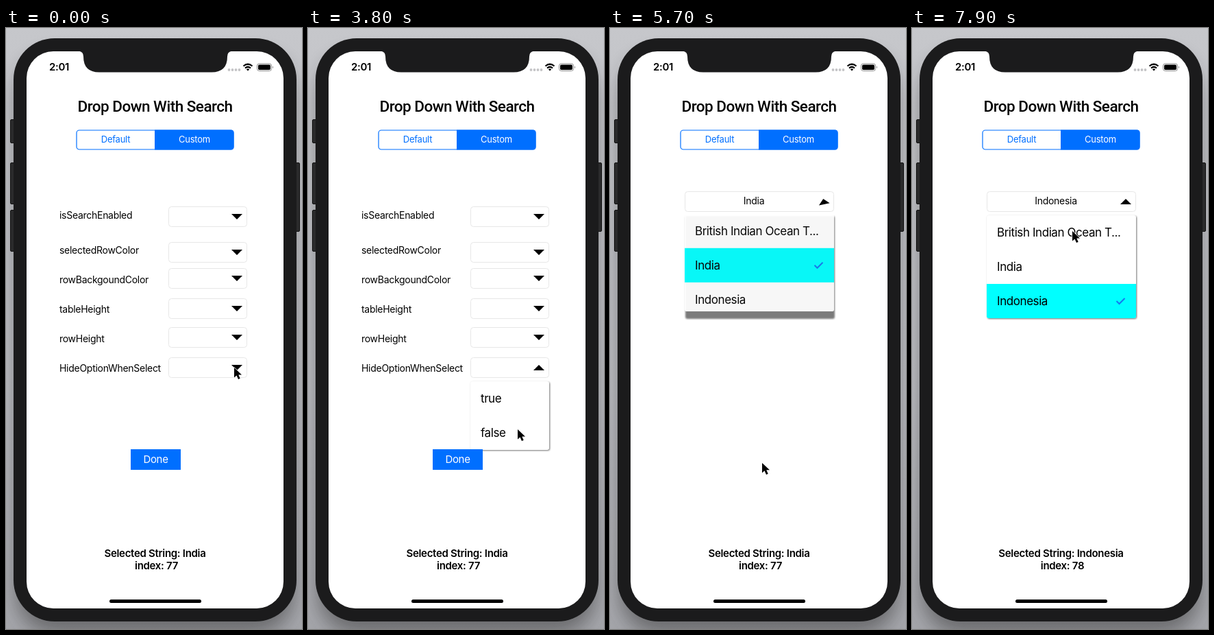
Recreate the animation shown at these times as an HTML page. Size 432x876 px, loop 8000 ms.

```html
<!DOCTYPE html>
<html lang="en">
<head>
<meta charset="utf-8">
<title>Drop down with search</title>
<style>
  html, body { margin: 0; width: 100%; height: 100%; overflow: hidden; background: #b9babf; }
  svg { display: block; width: 100vw; height: 100vh; }
  text { font-family: Inter, "Liberation Sans", sans-serif; font-size: 14px; letter-spacing: -.02em; white-space: pre; }
  .title { font-family: Roboto, sans-serif; font-size: 22.5px; font-weight: 500; letter-spacing: -.5px; }
  .mid { text-anchor: middle; }
  .bold { font-size: 15px; font-weight: 600; }
  .seg { font-size: 13px; }
  .done { font-size: 15px; }
  .row { font-size: 17px; letter-spacing: -.025em; }
  .field { fill: #fff; stroke: #e7e7e7; }
</style>
</head>
<body>
<svg id="stage" viewBox="0 0 432 876" xmlns="http://www.w3.org/2000/svg"></svg>
<script>
const LOOP = 8000, STEP = 100;
const BLUE = '#006fff', CYAN = '#00ffff';
const stage = document.getElementById('stage');

const text = (x, y, value, cls = '', extra = '') =>
  `<text x="${x}" y="${y}" class="${cls}" ${extra}>${value}</text>`;
const rect = (x, y, w, h, r, fill, extra = '') =>
  `<rect x="${x}" y="${y}" width="${w}" height="${h}" rx="${r}" fill="${fill}" ${extra}/>`;
const arrow = (x, y, id = '') =>
  `<g transform="translate(${x} ${y})"><path id="${id}" d="M-8-4H8L0 4Z"/></g>`;
const field = (x, y, w, id) =>
  `<rect class="field" x="${x + .5}" y="${y + .5}" width="${w - 1}" height="29" rx="4"/>` +
  arrow(x + w - 15, y + 15, id);
const check = y =>
  `<path d="M298.500 ${y + 25}l4 4 8-8" fill="none" stroke="#1478f0" stroke-width="2"/>`;

const options = [
  ['isSearchEnabled', 278, 260], ['selectedRowColor', 329, 312], ['rowBackgoundColor', 372, 350],
  ['tableHeight', 415, 394], ['rowHeight', 458, 436], ['HideOptionWhenSelect', 501, 480]
];

const dropList = id => `
  <rect id="${id}Shadow" rx="3" filter="url(#soft)"/>
  <clipPath id="${id}Clip"><rect id="${id}Mask" rx="3"/></clipPath>
  <g id="${id}" clip-path="url(#${id}Clip)">
    <rect id="${id}Back" fill="#fff"/><g id="${id}Rows"></g>
  </g>`;

const backdrop = `
  <defs>
    <linearGradient id="wall" x2="0" y2="1">
      <stop stop-color="#c6c7cb"/><stop offset=".6" stop-color="#bbbcc1"/><stop offset="1" stop-color="#a5a6ab"/>
    </linearGradient>
    <filter id="soft" x="-10%" y="-10%" width="120%" height="120%"><feGaussianBlur stdDeviation="1.2"/></filter>
    <filter id="haze" x="-20%" y="-20%" width="140%" height="140%"><feGaussianBlur stdDeviation="14"/></filter>
  </defs>
  ${rect(0, 0, 432, 876, 0, 'url(#wall)')}
  ${rect(14, 40, 407, 844, 60, '#333', 'opacity=".5" filter="url(#haze)"')}
  ${[[6, 133, 35], [6, 196, 61], [6, 265, 61], [421, 196, 101]].map(([x, y, h]) =>
    rect(x + .5, y + .5, 7, h - 1, 1.5, '#2b2b2c', 'stroke="#111"')).join('')}
  ${rect(11, 15, 413, 850, 60, '#1b1b1c')}
  ${rect(30, 34, 375, 812, 39, '#fff')}
  <path fill="#1b1b1c" d="M106 33.500q7 1 7 8q0 23 23 23H300q23 0 23-23q0-7 7-8Z"/>`;

const statusBar = `
  ${text(63, 62, '2:01', 'bold')}
  ${[325.5, 330.5, 335.5, 340.5].map(x => `<circle cx="${x}" cy="61" r="1.900" fill="#c4c4c6"/>`).join('')}
  <g fill="none" stroke="#000" stroke-width="2.200">
    <path d="M346.500 55.500q6.500-5.500 13 0M349 58.500q4-3.500 8 0"/>
  </g>
  <path d="M350.800 60.200q2.200-1.800 4.400 0L353 62.500Z"/>
  <rect x="366.500" y="52" width="21" height="10.500" rx="3" fill="none" stroke="#8a8a8a"/>
  ${rect(368, 53.500, 18, 7.500, 1.800, '#000')}
  <path d="M389 55.500q2 1.700 0 3.500Z" fill="#8a8a8a"/>`;

const header = `
  ${text(217.5, 122, 'Drop Down With Search', 'title mid')}
  <rect x="103" y="149" width="229" height="28" rx="4" fill="#fff" stroke="${BLUE}" stroke-width="1.200"/>
  <path d="M217 148.400H328.500q4 0 4 4V173.500q0 4-4 4H217Z" fill="${BLUE}"/>
  ${text(160, 167, 'Default', 'seg mid', `fill="${BLUE}"`)}
  ${text(275, 167, 'Custom', 'seg mid', 'fill="#fff"')}`;

stage.innerHTML = `
  ${backdrop}${statusBar}${header}
  <g id="settings">
    ${dropList('choice')}
    ${options.map(([label, base, top], i) =>
      text(78, base, label) + field(237, top, 115, i === 5 ? 'choiceArrow' : '')).join('')}
    ${text(244, 499, 'false', '', 'id="choiceText"')}
    ${rect(182, 614, 73, 30, 0, BLUE)}
    ${text(218.5, 634, 'Done', 'done mid', 'fill="#fff"')}
  </g>
  <g id="search">
    ${dropList('country')}
    ${field(109, 238, 218, 'countryArrow')}
    ${text(210, 257, '', 'mid', 'id="countryText"')}
  </g>
  ${text(217.5, 771, '', 'bold mid', 'id="result"')}
  ${text(219.5, 789, '', 'bold mid', 'id="index"')}
  ${rect(151, 833, 134, 5, 2.5, '#000')}
  <path id="cursor" d="M0 0V14.500L3.500 11.400 6 17 8.700 15.800 6.300 10.400H11Z"
    stroke="#fff" stroke-width="1.300" stroke-linejoin="round" paint-order="stroke"/>`;

const el = id => document.getElementById(id);
const set = (id, attrs) => { for (const k in attrs) el(id).setAttribute(k, attrs[k]); };
const show = (id, on) => set(id, { visibility: on ? 'visible' : 'hidden' });
const clamp = v => Math.min(1, Math.max(0, v));
const mix = (a, b, p) => a + (b - a) * p;
const smooth = p => p * p * (3 - 2 * p);

// Underdamped step response; ms since start.
function spring(ms, damping) {
  if (ms <= 0) return 0;
  const s = ms / 1000, decay = 7.6, wave = decay / damping * Math.sqrt(1 - damping ** 2);
  return 1 - Math.exp(-decay * s) * (Math.cos(wave * s) + decay / wave * Math.sin(wave * s));
}

function settle(ms) {
  const k = Math.max(0, ms) * .0093;
  return 1 - (1 + k) * Math.exp(-k);
}

const path = [
  [0, 333, 495], [950, 333, 495], [1400, 318, 612], [1800, 305, 596], [2100, 303, 583],
  [2300, 303, 583], [2600, 306, 585], [4150, 306, 585], [4800, 222, 633], [5900, 222, 634],
  [6700, 232, 397], [7250, 232, 397], [7800, 234, 296], [8000, 234, 296]
];

function cursorAt(t) {
  const i = path.findIndex(p => p[0] > t);
  const [t0, x0, y0] = path[i - 1], [t1, x1, y1] = path[i];
  const p = smooth((t - t0) / (t1 - t0));
  return [mix(x0, x1, p), mix(y0, y1, p)];
}

// A pressed row fades back in over its selection colour.
function pressedRow(x, y, w, label, alpha) {
  return `<g opacity="${alpha}">${rect(x, y, w, 50, 0, CYAN, 'opacity=".75"')}
    ${rect(x + 15, y, w - 30, 50, 0, CYAN, 'opacity=".6"')}${text(x + 15, y + 31, label, 'row')}</g>`;
}

function drawList(id, x, y, w, h, labels, alpha, selected, pressed, pressAlpha) {
  const box = { x, y, width: w, height: Math.max(0, h) };
  set(id + 'Mask', box);
  set(id + 'Back', box);
  set(id, { opacity: clamp(alpha) });
  el(id + 'Rows').innerHTML = labels.map((label, i) => {
    const top = y + i * 50;
    if (i === pressed) return pressedRow(x, top, w, label, pressAlpha);
    const mark = i === selected ? rect(x, top, w, 50, 0, CYAN) + check(top) : '';
    return mark + text(x + 15, top + 31, label, 'row');
  }).join('');
}

const drawShadow = (id, x, y, width, height, alpha) =>
  set(id + 'Shadow', { x, y, width, height, opacity: clamp(alpha) * .55 });

const turn = (id, degrees) => set(id, { transform: `rotate(${degrees})` });

function drawSettings(t) {
  const open = spring(t - 250, .65), close = settle(t - 4500);
  const pressing = t >= 4000 && t < 4500;
  const y = mix(mix(480, 515, open), 480, close);
  const h = mix(mix(30, 100, open), 0, close);
  show('choiceText', t >= 4500);
  turn('choiceArrow', 180 * (open + close));
  drawList('choice', 237, y, 115, h, ['true', 'false'], open * (1 - close), -1,
    pressing ? 1 : -1, smooth(clamp((t - 4000) / 500)));
  drawShadow('choice', 238, 516, 115, 100 - 35 * close, open * (1 - close));
  if (close > 0) set('choiceShadow', { y: 500, height: 116 - 35 * close });
}

function drawSearch(t) {
  const open = spring(t - 5350, .4);
  const pressing = t >= 6800 && t < 7300, done = t >= 7300;
  turn('countryArrow', 180 * open);
  drawList('country', 109, mix(238, 273, open), 218, mix(30, 150, open),
    ['British Indian Ocean T...', 'India', 'Indonesia'], open, done ? 2 : 1,
    pressing ? 2 : -1, smooth(clamp((t - 6800) / 500)));
  drawShadow('country', 110, 274, 218, 150, open);
  el('countryText').textContent = done ? 'Indonesia' : 'India';
}

function draw(t) {
  const searching = t >= 5350, picked = t >= 6800;
  set('settings', { display: searching ? 'none' : 'inline' });
  set('search', { display: searching ? 'inline' : 'none' });
  if (searching) drawSearch(t); else drawSettings(t);
  el('result').textContent = 'Selected String: ' + (picked ? 'Indonesia' : 'India');
  el('index').textContent = 'index: ' + (picked ? 78 : 77);
  set('cursor', { transform: `translate(${cursorAt(t)})` });
}

const start = performance.now();
function tick() {
  const t = (performance.now() - start) % LOOP;
  draw(Math.floor(t / STEP) * STEP);
  requestAnimationFrame(tick);
}
tick();
</script>
</body>
</html>
```
